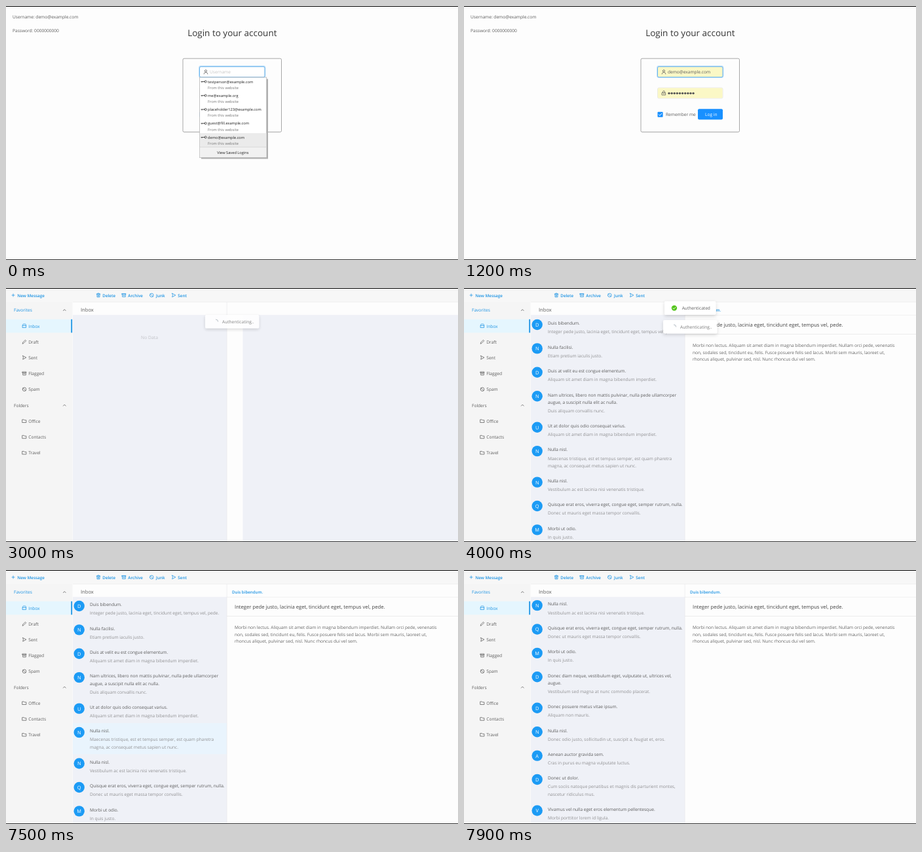
Write an HTML page that moves like this. It is 690 px wide and 388 px high and loops after 8000 ms.

```html
<!DOCTYPE html>
<html lang="en">
<head>
<meta charset="utf-8">
<title>Mail login</title>
<style>
  html, body { margin: 0; width: 100%; height: 100%; overflow: hidden; background: #fdfdfd; }
  svg { display: block; width: 100%; height: 100%; }
  text { font-family: "Open Sans", "Noto Sans", sans-serif; text-rendering: geometricPrecision; white-space: pre; }
  .icon { fill: none; stroke-width: .75; stroke-linejoin: round; stroke-linecap: round; }
</style>
</head>
<body>
<svg id="stage" viewBox="0 0 690 388"></svg>
<script>
const LOOP = 8000, STEP = 100;
const BLUE = '#1890ff', LINK = '#1c93e3', TEXT = '#5c5c5c', MUTED = '#909092', PANEL = '#eff1f7';
const ROW = 36.4, LINE = 11.1;

// y is the visual middle of the line
const text = (x, y, str, { size = 6.6, fill = TEXT, weight = 400, anchor = 'start' } = {}) =>
  `<text x="${x}" y="${y + size * .355}" font-size="${size}" fill="${fill}" font-weight="${weight}" text-anchor="${anchor}">${str}</text>`;
const rect = (x, y, w, h, fill, extra = '') =>
  `<rect x="${x}" y="${y}" width="${w}" height="${h}" fill="${fill}" ${extra}/>`;
const circle = (x, y, r, fill) => `<circle cx="${x}" cy="${y}" r="${r}" fill="${fill}"/>`;
const group = (id, body, extra = '') => `<g id="${id}" ${extra}>${body}</g>`;

// Icons are drawn around their own centre
const icons = {
  plus: 'M-2 0H2M0-2V2',
  up: 'M-1.9 1L0-1L1.9 1',
  inbox: 'M-2.6-1.4L-1.8-2.7H1.8L2.6-1.4V2.7H-2.6ZM-2.6-.4H2.6',
  draft: 'M-2.8 2.8L-2.2 .9L1.4-2.7L2.7-1.4L-.9 2.2Z',
  sent: 'M-2.3-2.8L2.9 0L-2.3 2.8L-1.6 0Z',
  archive: 'M-2.8-2.5H2.8V-1H-2.8ZM-2.3-1V2.5H2.3V-1M-.9 .4H.9',
  ban: 'M-2.8 0A2.8 2.8 0 1 0 2.8 0A2.8 2.8 0 1 0-2.8 0M-2-2L2 2',
  folder: 'M-2.9-2.2H-.6L.2-1.3H2.9V2.3H-2.9Z',
  trash: 'M-2.8-1.8H2.8M-1.2-1.8V-2.9H1.2V-1.8M-2.2-1.8L-1.9 2.9H1.9L2.2-1.8M-.7-.4V1.6M.7-.4V1.6',
  user: 'M-1.6-1.5A1.6 1.6 0 1 0 1.6-1.5A1.6 1.6 0 1 0-1.6-1.5M-2.8 3.2C-2.6-.6 2.6-.6 2.8 3.2',
  lock: 'M-2.6-.4H2.6V3H-2.6ZM-1.5-.4V-1.8A1.5 1.5 0 0 1 1.5-1.8V-.4M0 .9V1.7',
  key: 'M-4 0H1M-3-0V1M1 0A1.6 1.6 0 1 0 4.2 0A1.6 1.6 0 1 0 1 0',
  check: 'M-2.1 0L-.6 1.6L2.2-1.5'
};
const icon = (name, x, y, color = TEXT, width = .75) =>
  `<path class="icon" style="stroke-width:${width}" d="${icons[name]}" transform="translate(${x} ${y})" stroke="${color}"/>`;

const ACCOUNT = 'demo@example.com';
const logins = ['testperson@example.com', 'me@example.org', 'placeholder123@example.com', 'guest@fill.example.com', ACCOUNT];

function loginPage() {
  const field = y => rect(295.5, y, 99.5, 16, '#fff', 'rx="2" stroke="#d9d9d9" stroke-width=".6"');
  const fill = y => rect(295.8, y + .3, 98.9, 15.4, '#fbf8c6', 'rx="2"');
  const dots = Array.from({ length: 10 }, (_, i) => circle(313 + i * 4.12, 133.3, 1.65, '#555')).join('');
  const rows = logins.map((name, i) => {
    const y = 115.5 + i * 21.25;
    return icon('key', 302, y, '#444', .9) + text(308, y, name, { size: 5.7, fill: '#222' }) +
      text(308, y + 9.3, 'From this website', { size: 5.7, fill: '#777' });
  }).join('');

  return text(10, 17, 'Username: ' + ACCOUNT) + text(10, 37.6, 'Password: 0000000000') +
    text(345.3, 41, 'Login to your account', { size: 13.5, fill: '#333', anchor: 'middle' }) +
    rect(270, 80.2, 150.5, 112.3, 'none', 'rx="2" stroke="#929292" stroke-width=".8"') +
    group('focus', rect(295, 92, 100.5, 17, 'none', 'rx="2.5" stroke="#bfe0fb" stroke-width="1.8"')) +
    field(92.7) + field(125) +
    text(311, 101, 'Username', { fill: '#c4c4c4' }) +
    group('filled', fill(92.7) + fill(125) + text(311, 101, ACCOUNT) + dots) +
    group('focusLine', rect(295.5, 92.7, 99.5, 16, 'none', 'rx="2" stroke="#4aa9ee" stroke-width=".8"')) +
    icon('user', 305, 100.7) + icon('lock', 305, 133) +
    rect(295.5, 161.7, 8.1, 8.1, BLUE, 'rx="1"') + icon('check', 299.5, 165.8, '#fff', 1) +
    text(308, 166, 'Remember me') +
    `<rect id="wave" rx="3" fill="none" stroke="${BLUE}"/>` +
    rect(357, 157.2, 38, 16.2, BLUE, 'rx="2"') + text(368, 166, 'Log in', { fill: '#fff' }) +
    group('dropdown',
      rect(298, 111.5, 102, 122, '#b0b0b0') +
      rect(295.4, 109, 102.4, 122.4, '#fff', 'stroke="#aaa" stroke-width=".7"') +
      rect(295.8, 194.2, 101.6, 21.2, '#ebebeb') + rect(295.8, 215.4, 101.6, 15.7, '#f1f1f1') +
      rect(295.8, 215.2, 101.6, .6, '#ccc') + rows +
      text(346.4, 224.3, 'View Saved Logins', { size: 5.7, fill: '#222', anchor: 'middle' }));
}

// Each entry: title | description, "/" breaks a line
const mails = `Duis bibendum.|Integer pede justo, lacinia eget, tincidunt eget, tempus vel, pede.
Nulla facilisi.|Etiam pretium iaculis justo.
Duis at velit eu est congue elementum.|Aliquam sit amet diam in magna bibendum imperdiet.
Nam ultrices, libero non mattis pulvinar, nulla pede ullamcorper/augue, a suscipit nulla elit ac nulla.|Duis aliquam convallis nunc.
Ut at dolor quis odio consequat varius.|Aliquam sit amet diam in magna bibendum imperdiet.
Nulla nisl.|Maecenas tristique, est et tempus semper, est quam pharetra/magna, ac consequat metus sapien ut nunc.
Nulla nisl.|Vestibulum ac est lacinia nisi venenatis tristique.
Quisque erat eros, viverra eget, congue eget, semper rutrum, nulla.|Donec ut mauris eget massa tempor convallis.
Morbi ut odio.|In quis justo.
Donec diam neque, vestibulum eget, vulputate ut, ultrices vel,/augue.|Vestibulum sed magna at nunc commodo placerat.
Donec posuere metus vitae ipsum.|Aliquam non mauris.
Nulla nisl.|Donec odio justo, sollicitudin ut, suscipit a, feugiat et, eros.
Aenean auctor gravida sem.|Cras in purus eu magna vulputate luctus.
Donec ut dolor.|Cum sociis natoque penatibus et magnis dis parturient montes,/nascetur ridiculus mus.
Vivamus vel nulla eget eros elementum pellentesque.|Morbi porttitor lorem id ligula.`
  .split('\n').map(row => row.split('|').map(part => part.split('/')));
const HOVERED = 5;

function mailRows() {
  let top = 41.8;
  return mails.map(([title, body], i) => {
    const height = ROW + LINE * (title.length + body.length - 2);
    const bodyTop = top + 14.2 + LINE * title.length;
    const row = (i === HOVERED ? rect(102, top, 235, height, '#e9f4fd', 'id="hover"') : '') +
      circle(111.7, top + 14.2, 8.2, '#1c9bf5') +
      text(111.7, top + 14.5, title[0][0], { size: 7.4, fill: '#fff', anchor: 'middle' }) +
      title.map((s, n) => text(128, top + 12.2 + n * LINE, s)).join('') +
      body.map((s, n) => text(128, bodyTop + n * LINE, s, { fill: MUTED })).join('');
    top += height;
    return row;
  }).join('');
}

function mailPage() {
  const menu = ['Favorites', 'Inbox inbox', 'Draft draft', 'Sent sent', 'Flagged archive', 'Spam ban',
    'Folders', 'Office folder', 'Contacts folder', 'Travel folder'].map((entry, i) => {
    const [label, name] = entry.split(' '), y = 34 + i * 24.23;
    const fill = i < 2 ? LINK : TEXT;
    return name ? icon(name, 28, y - .4, fill) + text(34.3, y, label, { fill })
      : text(12, y, label, { fill }) + icon('up', 89.3, y - .3, TEXT);
  }).join('');
  const tools = [['plus', 11, 17.3, 'New Message'], ['trash', 141, 147.3, 'Delete'], ['archive', 180, 186.3, 'Archive'],
    ['ban', 222.3, 229, 'Junk'], ['sent', 256, 262.3, 'Sent']]
    .map(([name, ix, tx, label]) => icon(name, ix, 11, LINK) + text(tx, 11.4, label, { size: 6.3, fill: LINK, weight: 600 })).join('');
  const body = ['Morbi non lectus. Aliquam sit amet diam in magna bibendum imperdiet. Nullam orci pede, venenatis',
    'non, sodales sed, tincidunt eu, felis. Fusce posuere felis sed lacus. Morbi sem mauris, laoreet ut,',
    'rhoncus aliquet, pulvinar sed, nisl. Nunc rhoncus dui vel sem.'];
  const toast = (id, x, w, content) => group(id,
    rect(x, -10.3, w, 20.6, '#fff', 'rx="2" filter="url(#shadow)"') + content);

  return rect(0, 0, 690, 388, '#fdfdfd') + rect(0, 0, 690, 21.3, '#f7f7f7') + rect(0, 21, 101.5, 367, '#f5f5f5') +
    rect(0, 47.8, 101, 20.5, '#e5f6fe') + rect(99.3, 47.8, 1.8, 20.5, LINK) +
    rect(102, 21, 588, .6, '#ececec') + rect(102, 41.2, 235, 347, PANEL) + tools + menu +
    text(114, 33.3, 'Inbox', { size: 7.6 }) +
    group('empty', rect(361.5, 41.2, 329, 347, PANEL) +
      text(219, 76, 'No Data', { size: 6.8, fill: '#c2c3c8', anchor: 'middle' })) +
    group('loaded',
      `<g clip-path="url(#listClip)">${group('list', mailRows())}</g>` +
      text(345, 33.6, 'Duis bibendum.', { size: 6.2, fill: LINK, weight: 600 }) +
      rect(337, 41, 353, .6, '#e9e9e9') + rect(337, 70, 353, .7, '#e6e6e6') +
      text(349, 56.4, 'Integer pede justo, lacinia eget, tincidunt eget, tempus vel, pede.', { size: 7.68, fill: '#444' }) +
      body.map((s, i) => text(349, 87.8 + i * 10.6, s, { fill: '#666' })).join('')) +
    rect(336.8, 21.3, .6, 367, '#e6e6e8') +
    toast('loading', 304, 82.3,
      `<path id="spinner" class="icon" d="M0-3.2A3.2 3.2 0 0 1 3.2 0" stroke="#9aa4ae"/>` +
      text(330, .3, 'Authenticating..', { fill: '#777' })) +
    toast('success', 306, 78.3,
      circle(321, 0, 4.2, '#52c41a') + icon('check', 321, 0, '#fff', .9) + text(332.7, .2, 'Authenticated'));
}

const stage = document.getElementById('stage');
stage.innerHTML = `<defs>
  <clipPath id="listClip">${rect(102, 41.2, 235, 347, '#000')}</clipPath>
  <filter id="shadow" x="-20%" y="-50%" width="140%" height="220%">
    <feDropShadow dx="0" dy="2" stdDeviation="2.5" flood-color="#000" flood-opacity=".16"/>
  </filter></defs>` +
  rect(0, 0, 690, 388, '#fdfdfd') + group('login', loginPage()) + group('mail', mailPage()) +
  rect(0, 0, 690, 1, '#000') + rect(0, 387, 690, 1, '#333');

const part = Object.fromEntries([...stage.querySelectorAll('[id]')].map(el => [el.id, el]));
const ramp = (t, from, to) => Math.min(1, Math.max(0, (t - from) / (to - from)));
const smooth = p => p * p * (3 - 2 * p);
const easeOut = p => 1 - (1 - p) ** 3;
const set = (el, attrs) => { for (const key in attrs) el.setAttribute(key, attrs[key]); };
const show = (el, on) => set(el, { display: on ? 'inline' : 'none' });

function drawLogin(t) {
  show(part.dropdown, t < 900);
  set(part.filled, { opacity: ramp(t, 800, 1100) });
  const focus = 1 - ramp(t, 1600, 2000);
  set(part.focus, { opacity: focus });
  set(part.focusLine, { opacity: focus });
  const wave = ramp(t, 1600, 2300), spread = 2.5 * easeOut(wave);
  set(part.wave, {
    x: 357 - spread / 2, y: 157.2 - spread / 2, width: 38 + spread, height: 16.2 + spread,
    'stroke-width': spread, opacity: .25 * (1 - wave)
  });
}

function drawMail(t) {
  const loaded = t >= 3500;
  show(part.empty, !loaded);
  show(part.loaded, loaded);

  const leave = ramp(t, 4000, 4400);
  const loadingIn = easeOut(ramp(t, 2900, 3200)), successIn = easeOut(ramp(t, 3100, 3400));
  const lift = -20 * leave * leave;
  set(part.loading, { transform: `translate(0 ${59.2 - 27 * (1 - loadingIn) + lift})`, opacity: Math.min(1, loadingIn * 1.3) * (1 - leave) });
  set(part.success, { transform: `translate(0 ${30.6 - 20 * (1 - successIn) + lift})`, opacity: successIn * (1 - leave) });
  set(part.spinner, { transform: `translate(320.5 0) rotate(${(t - 3000) * .36})` });

  set(part.list, { transform: `translate(0 ${-242.5 * smooth(ramp(t, 7484, 7900))})` });
  set(part.hover, { opacity: ramp(t, 7000, 7300) });
}

function frame(now) {
  const t = Math.floor((now % LOOP) / STEP) * STEP;
  const signedIn = t >= 3000;
  show(part.login, !signedIn);
  show(part.mail, signedIn);
  signedIn ? drawMail(t) : drawLogin(t);
}

const start = performance.now();
(function tick() {
  frame(performance.now() - start);
  requestAnimationFrame(tick);
})();
</script>
</body>
</html>
```
